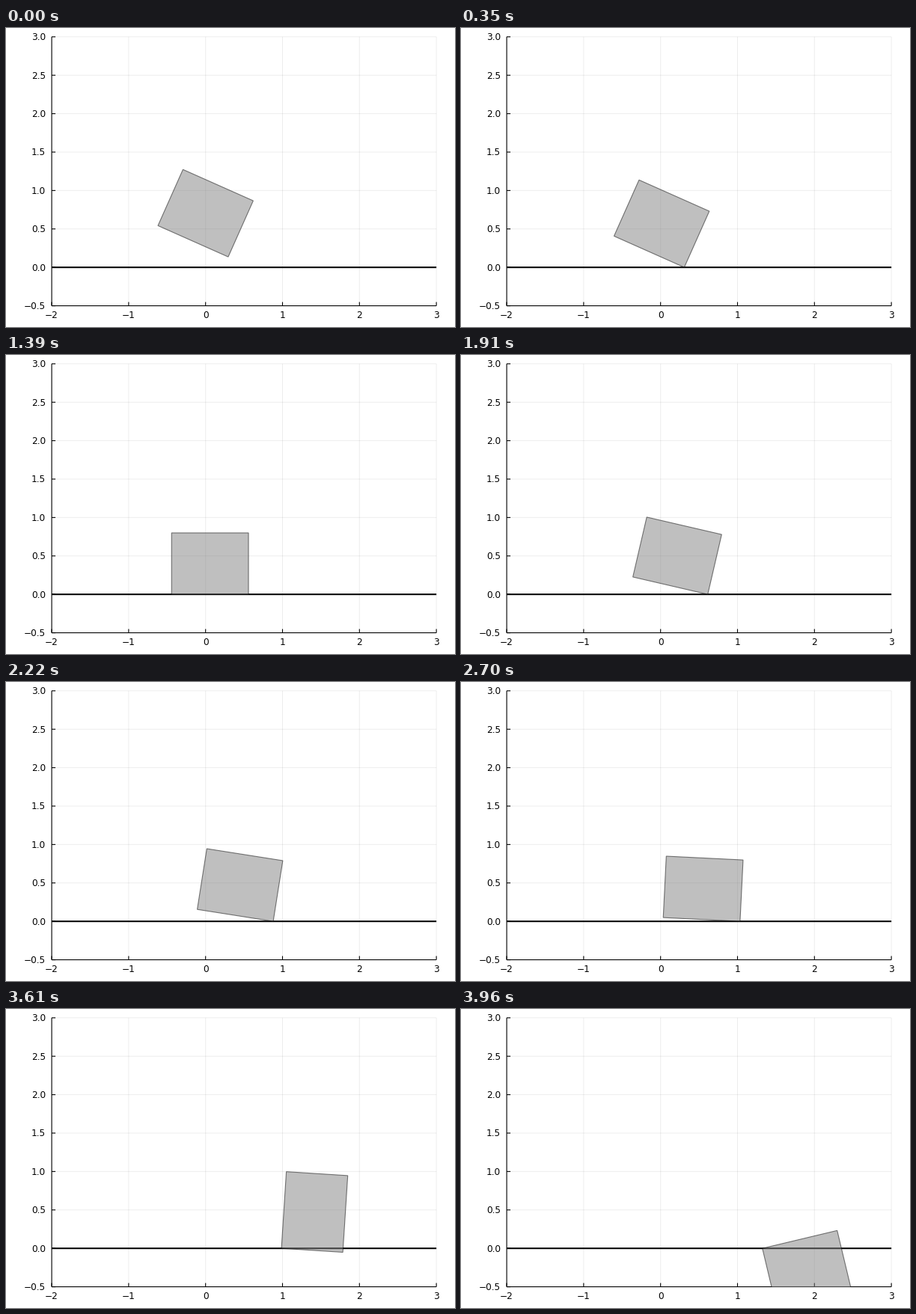
Animation of 600 by 400 pixels, one loop 4.01 s. Source, as a matplotlib script:

```python
import numpy as np
import matplotlib.pyplot as plt
from matplotlib.animation import FuncAnimation
from matplotlib.collections import LineCollection
from matplotlib.patches import Polygon, Rectangle

W, H, DPI = 600, 400, 100
PX = 72 / DPI                      # one pixel in points
SCALE, X0, Y0 = 102.8, 266.7, 320.2
FPS, STEPS = 23, 92
LOOP, TICK = 4010, 10              # ms

XT = np.arange(-2, 4)
YT = np.arange(-0.5, 3.1, 0.5)
CORNERS = np.array([(-.5, -.4), (.5, -.4), (.5, .4), (-.5, .4)])


def ramp(k, start, length):
    return min(max((k - start) / length, 0), 1)


def ease(u):
    return u * u * (3 - 2 * u)


def to_px(pts):
    return np.asarray(pts, float) * (SCALE, -SCALE) + (X0, Y0)


def pose(k):
    """Clockwise tilt in degrees, centre x and gap under the lowest pivot."""
    fall = ramp(k, 0, 8)
    settle = ramp(k, 8, 24) ** 2.83
    shove = ramp(k, 37, 19)
    tip = ease(ramp(k, 59, 20))
    roll = ease(ramp(k, 75, 20))
    tilt = (24 * (1 - settle) + 15.2 * np.sin(np.pi * shove) ** 1.73
            + 46.5 * tip + 134 * roll)
    x = (.014 * fall + .044 * settle + .46 * ease(shove ** .93)
         + .585 * tip + .892 * roll)
    return tilt, x, .136 * (1 - fall)


def box(k):
    tilt, x, gap = pose(k)
    a = np.radians(tilt)
    c, s = np.cos(a), np.sin(a)
    # the lower right corner is the pivot on the ground
    centre = (x, gap + .5 * s + .4 * c)
    return to_px(CORNERS @ np.array([(c, -s), (s, c)]) + centre)


fig = plt.figure(figsize=(W / DPI, H / DPI), dpi=DPI, facecolor="white")
ax = fig.add_axes([0, 0, 1, 1])
ax.set(xlim=(0, W), ylim=(H, 0))
ax.axis("off")

left, bottom = to_px((-2, -.5))
right, top = to_px((3, 3))
tx = to_px([(x, 0) for x in XT])[:, 0]
ty = to_px([(0, y) for y in YT])[:, 1]


def lines(segs, width, z, alpha=1):
    ax.add_collection(LineCollection(segs, linewidths=width * PX, colors="black",
                                     alpha=alpha, zorder=z, snap=False),
                      autolim=False)


def label(x, y, text, ha):
    ax.text(x, y, text.replace("-", "\u2212"), ha=ha, va="baseline",
            family="DejaVu Sans", size=8.7, color="black")


lines([[(x, top), (x, bottom)] for x in tx] + [[(left, y), (right, y)] for y in ty],
      1, 1, alpha=.07)
lines([[(left, bottom), (right, bottom)], [(left, top), (left, bottom)]]
      + [[(x, bottom), (x, bottom - 5)] for x in tx]
      + [[(left, y), (left + 5, y)] for y in ty], 1.1, 2)
lines([[(left, Y0), (right, Y0)]], 2, 3)

for x, p in zip(XT, tx):
    label(p, 387.6, f"{x}", "center")
for y, p in zip(YT, ty):
    label(53.2, p + 4.4, f"{y:.1f}", "right")

block = Polygon(box(0), closed=True, facecolor=(.5, .5, .5, .5),
                edgecolor=(0, 0, 0, .5), linewidth=1.1 * PX, zorder=4, snap=False)
ax.add_patch(block)
block.set_clip_path(Rectangle((left, top), right - left, bottom - top,
                              transform=ax.transData))


def update(i):
    step = min(int((i + .5) * TICK * FPS / 1000), STEPS - 1)
    block.set_xy(box(step))
    return (block,)


anim = FuncAnimation(fig, update, frames=LOOP // TICK, interval=TICK,
                     repeat=True, repeat_delay=0, blit=False)
plt.show()
```
